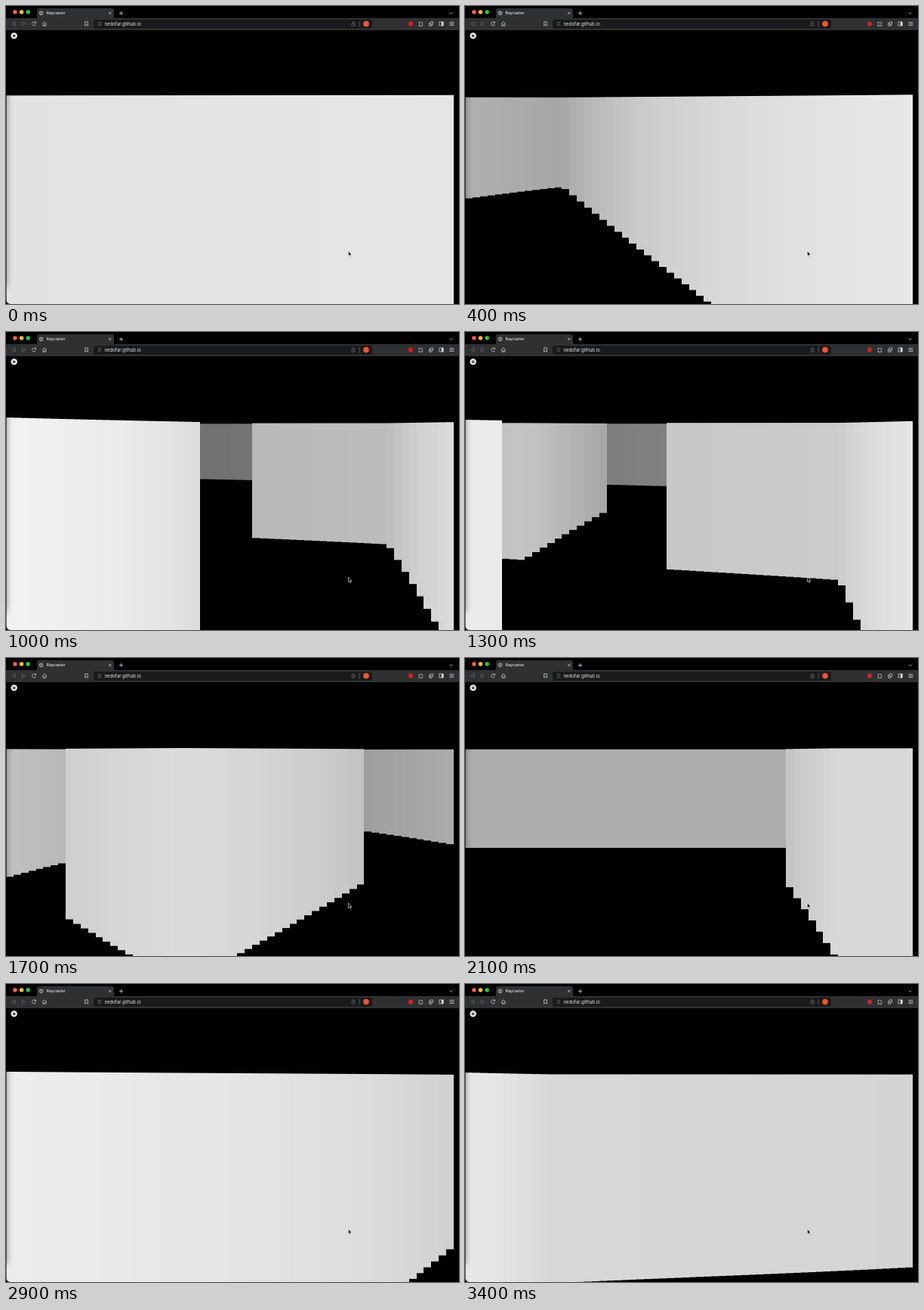
These frames come from a looping animation (600x394 px, 3500 ms). An HTML page with a canvas:

```html
<!DOCTYPE html>
<html lang="en">
<head>
<meta charset="utf-8">
<title>Raycaster</title>
<style>
  html, body { margin: 0; width: 100%; height: 100%; overflow: hidden; background: #000; }
  canvas, svg { position: absolute; left: 0; top: 0; width: 600px; height: 394px; }
  text { font-family: Inter, Roboto, "Liberation Sans", sans-serif; fill: #e8e8ea; }
  .line { fill: none; stroke: #c9cacc; stroke-width: .8; }
  .dim { stroke: #66686b; }
</style>
</head>
<body>
<canvas id="view" width="600" height="394"></canvas>
<svg viewBox="0 0 600 394">
  <defs>
    <filter id="soft" filterUnits="userSpaceOnUse" x="-40" y="60" width="80" height="334">
      <feGaussianBlur stdDeviation="5"/>
    </filter>
  </defs>

  <!-- page edge -->
  <rect x="-20" y="100" width="21" height="270" fill="#000" opacity=".38" filter="url(#soft)"/>
  <rect y="32" width=".8" height="362" fill="#000" opacity=".75"/>
  <path d="M0 388V394H6A6 6 0 0 1 0 388Z" fill="#000"/>

  <!-- tab strip -->
  <rect width="600" height="17" fill="#000"/>
  <circle cx="12" cy="8" r="2.7" fill="#fe5f57"/>
  <circle cx="20.6" cy="8" r="2.7" fill="#febc2e"/>
  <circle cx="29.2" cy="8" r="2.7" fill="#28c840"/>
  <path d="M39 17Q41 17 41 14V6Q41 3 44 3H140Q143 3 143 6V14Q143 17 145 17Z" fill="#2f3032"/>
  <circle cx="46.6" cy="9.4" r="2.4" class="line"/>
  <path d="M44.6 8.4L47 9.4L46.2 11.6M47.4 7.2L48.6 9" class="line"/>
  <text x="53.8" y="11.4" font-size="5.2" font-weight="500">Raycaster</text>
  <path d="M136.3 7.8L139.5 11M139.5 7.8L136.3 11" class="line"/>
  <path d="M150 9.5H155M152.5 7V12" class="line"/>
  <path d="M587.6 8.6L589.6 10.6L591.6 8.6" class="line"/>

  <!-- toolbar -->
  <rect y="16" width="600" height="16" fill="#2f3032"/>
  <path d="M12.2 20.8V26.2L7.8 23.5Z" class="line dim"/>
  <path d="M21.4 20.8V26.2L25.8 23.5Z" class="line dim"/>
  <path d="M39.3 22.2A2.5 2.5 0 1 0 39.5 24.2M39.6 20.6V22.5H37.6" class="line"/>
  <path d="M48.2 23.6L51 20.9L53.8 23.6M49 23V26.2H53V23M51 26V24.4" class="line"/>
  <path d="M104.7 20.9H108.3V26.2L106.5 24.7L104.7 26.2Z" class="line"/>
  <rect x="116" y="18" width="369" height="11.8" rx="2.5" fill="#191a1b"/>
  <path d="M121.6 22H123M125 22H126.4M121.6 25H122.6M124.6 25H126.4" class="line dim"/>
  <circle cx="124" cy="22" r=".8" class="line dim"/>
  <circle cx="123.6" cy="25" r=".8" class="line dim"/>
  <text x="130.4" y="25.7" font-size="6.05">nedofar.github.io</text>
  <path d="M459 22.6H458V26.2H462V22.6H461M460 24.4V20.6M458.8 21.7L460 20.5L461.2 21.7" class="line dim"/>
  <path d="M468.3 20V27.4" class="line dim"/>
  <circle cx="477" cy="23.6" r="3.8" fill="#f2562f"/>
  <circle cx="536" cy="23.5" r="3.1" fill="#d3201f"/>
  <path d="M547 21.8H548.4A1 1 0 0 1 550.2 21.8H551.4V23.2A1 1 0 0 1 551.4 25V26.3H547V25A1 1 0 0 0 547 23.2Z" class="line"/>
  <path d="M562.2 21H565.6V24.2H562.2ZM562 22.8H560.6V26.2H564V24.4" class="line"/>
  <rect x="574" y="21" width="5.2" height="5" class="line"/>
  <rect x="576.8" y="21" width="2.4" height="5" fill="#d8d9da"/>
  <path d="M587.4 21.5H593.4M587.4 23.5H593.4M587.4 25.5H593.4" class="line"/>

  <!-- settings button -->
  <circle cx="10.7" cy="39.4" r="4.2" fill="#f2f2f2"/>
  <circle cx="10.7" cy="39.4" r="1.5" fill="#111" stroke="#111" stroke-width=".7" stroke-dasharray=".7 .5"/>
  <circle cx="10.7" cy="39.4" r=".6" fill="#f2f2f2"/>

  <!-- pointer -->
  <path d="M453.4 324V330.6L454.9 329.2L455.9 331.4L457 330.9L456 328.8H458Z"
        fill="#000" stroke="#fff" stroke-width=".6" stroke-linejoin="round"/>
</svg>
<script>
const ctx = document.getElementById('view').getContext('2d');
const LOOP = 3500, STEP = 100;
const COLUMNS = 60, VIEW_WIDTH = 593, HORIZON = 122, SCALE = 484;
const CELL = 1.65;               // cells are longer along u than along v
const FIRST_U = -2, FIRST_V = -3;
const MAP = ['##..', '##..', '..#.', '....', '.#.#', '...#'];

// time, u, v, heading in degrees
const PATH = [
  [0, -1.3, -.15, 83],
  [700, -.64, .185, -9.5],
  [1300, .84, .58, -10],
  [1700, 2.24, .16, -41],
  [2100, 2.683, .752, -90],
  [2900, 1.3, -2.133, -50],
  [3400, .462, -1.185, -85]
];

const rad = deg => deg * Math.PI / 180;
const isOpen = (i, j) => MAP[i - FIRST_U]?.[j - FIRST_V] === '.';

function pose(time) {
  let k = 0;
  while (k < PATH.length - 2 && time >= PATH[k + 1][0]) k++;
  const a = PATH[k], b = PATH[k + 1];
  const f = (time - a[0]) / (b[0] - a[0]);
  return a.slice(1).map((p, n) => p + (b[n + 1] - p) * f);
}

// Walks the grid until a wall is met and returns the ray length.
function castRay(u, v, angle) {
  const du = Math.cos(angle) / CELL, dv = Math.sin(angle);
  const u0 = u / CELL;
  let i = Math.floor(u0), j = Math.floor(v);
  const si = du > 0 ? 1 : -1, sj = dv > 0 ? 1 : -1;
  const stepU = Math.abs(1 / du), stepV = Math.abs(1 / dv);
  let nextU = (du > 0 ? i + 1 - u0 : u0 - i) * stepU;
  let nextV = (dv > 0 ? j + 1 - v : v - j) * stepV;
  let dist = 0;
  while (isOpen(i, j)) {
    if (nextU < nextV) { dist = nextU; nextU += stepU; i += si; }
    else { dist = nextV; nextV += stepV; j += sj; }
  }
  return dist;
}

function draw(time) {
  const [u, v, heading] = pose(time);
  ctx.fillStyle = '#000';
  ctx.fillRect(0, 0, 600, 394);
  for (let c = 0; c < COLUMNS; c++) {
    const offset = c - COLUMNS / 2;
    const depth = Math.max(.05, castRay(u, v, rad(heading + offset)) * Math.cos(rad(offset)));
    const height = SCALE / depth;
    const grey = Math.max(0, Math.round(252 - 20.8 * depth));
    const left = Math.round(c * VIEW_WIDTH / COLUMNS);
    const right = Math.round((c + 1) * VIEW_WIDTH / COLUMNS);
    const top = HORIZON - .0095 * height;
    ctx.fillStyle = `rgb(${grey},${grey},${grey})`;
    ctx.fillRect(left, top, right - left, HORIZON + height - top);
  }
}

const start = performance.now();
function tick() {
  const time = (performance.now() - start) % LOOP;
  draw(Math.floor(time / STEP) * STEP);
  requestAnimationFrame(tick);
}
tick();
</script>
</body>
</html>
```
